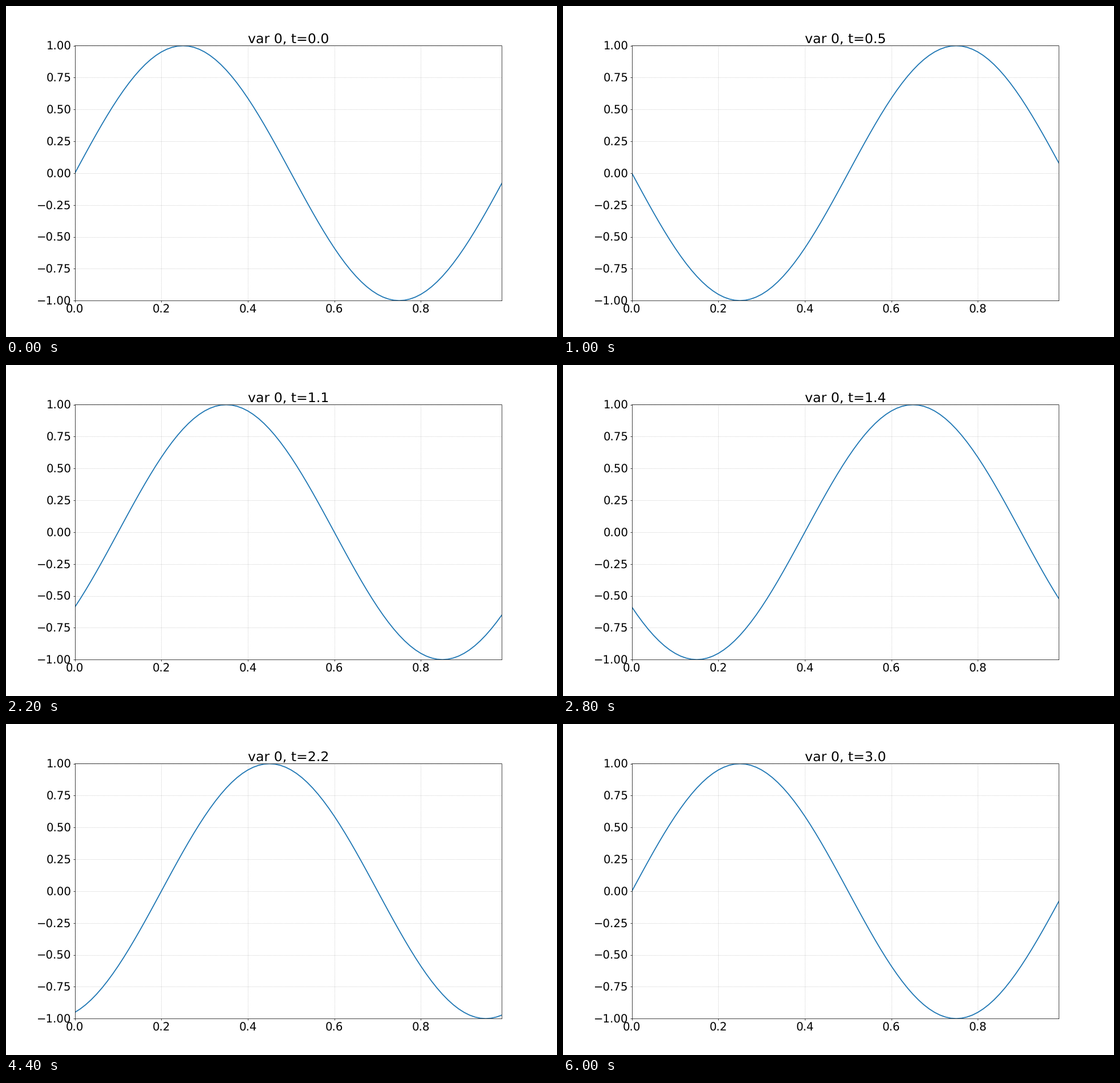
These frames come from a looping animation (966 by 580 pixels, 6.2 s). A matplotlib script:

```python
import matplotlib.pyplot as plt
import numpy as np
from matplotlib.animation import FuncAnimation

W, H, DPI = 966, 580, 64.5
FRAMES, STEP_MS = 31, 200
POINTS = 80

plt.rcParams.update({
    "font.family": "DejaVu Sans",
    "font.size": 22,
    "axes.titlesize": "large",
    "text.hinting": "none",
})

fig, ax = plt.subplots(figsize=(W / DPI, H / DPI), dpi=DPI, facecolor="white")
fig.subplots_adjust(left=0.125, right=0.9, bottom=0.11, top=0.88)

x = np.arange(POINTS) / POINTS
line, = ax.plot(x, np.zeros(POINTS), color="#1f77b4", lw=2)
title = ax.set_title("")

ax.set_xlim(x[0], x[-1])
ax.set_ylim(-1, 1)
ax.set_xticks(np.arange(0, 0.9, 0.2))
ax.set_yticks(np.linspace(-1, 1, 9))
ax.grid(linestyle=":")
ax.spines["top"].set_snap(False)


def update(i):
    """Sine wave of period 1 travelling right at unit speed."""
    t = i / 10
    line.set_ydata(np.sin(2 * np.pi * (x - t)))
    title.set_text(f"var 0, t={t:.1f}")
    return line, title


anim = FuncAnimation(fig, update, frames=FRAMES, interval=STEP_MS,
                     init_func=lambda: update(0), repeat=True, blit=False)

plt.show()
```
